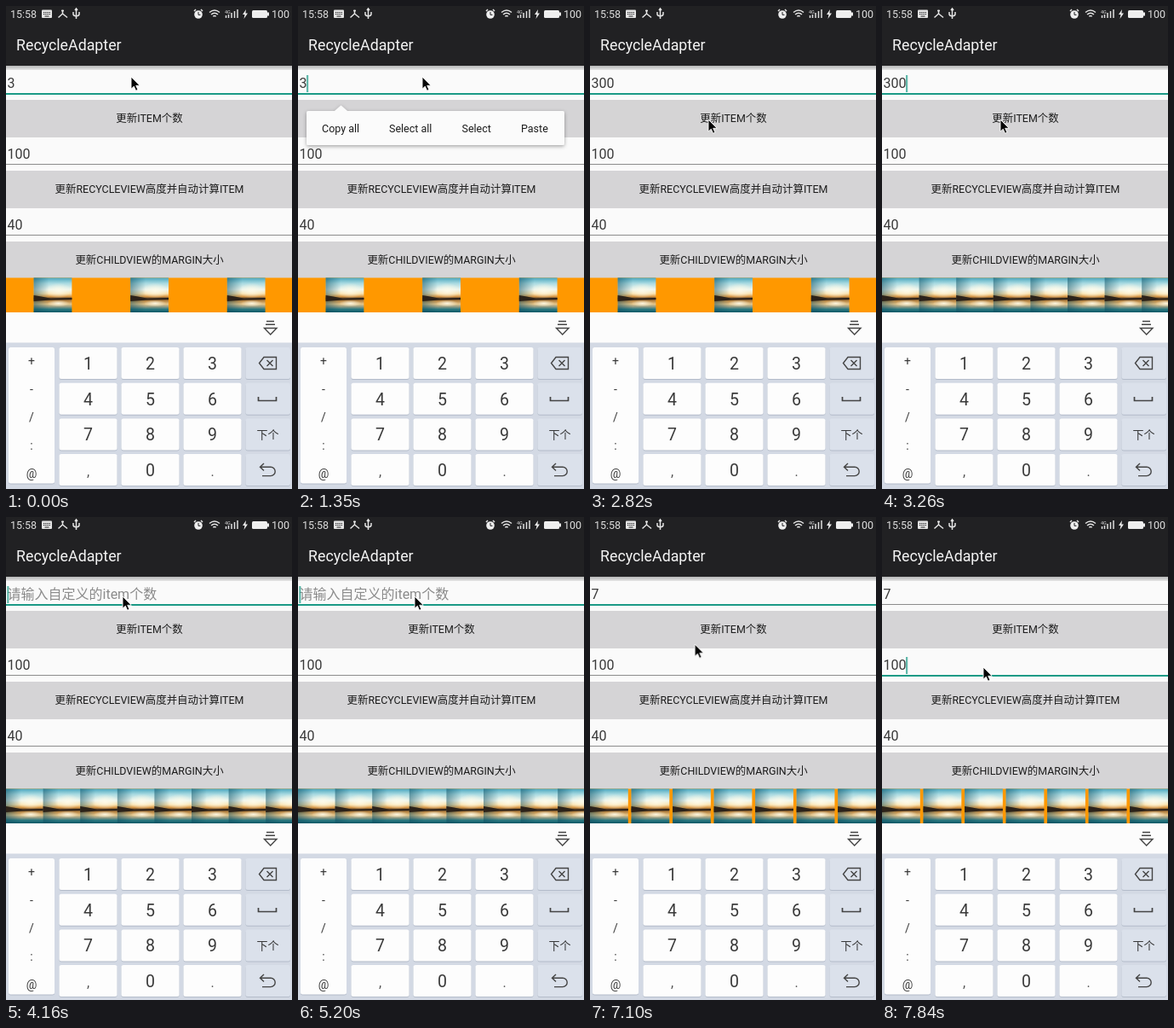
Write an HTML page that moves like this. It is 336 px wide and 566 px high and loops after 7990 ms.

```html
<!DOCTYPE html>
<html lang="zh">
<head>
<meta charset="utf-8">
<title>RecycleAdapter</title>
<style>
html, body { margin: 0; width: 100%; height: 100%; overflow: hidden; background: #fafafa; }
svg { display: block; width: 336px; height: 566px; }
text { font-family: Roboto, "Noto Sans CJK SC", "Noto Sans CJK", sans-serif; }
.mid { text-anchor: middle; }
.field { font-size: 16px; fill: #3a3a3a; }
.hint { fill: #8b8b8b; }
.btn { font-size: 12.45px; fill: #1c1c1c; text-anchor: middle; }
.menu { font-size: 12.5px; fill: #1c1c1c; }
.status { font-size: 12.5px; fill: #dedede; }
.digit { font-size: 19.5px; fill: #3a3a3a; text-anchor: middle; }
.dot { font-size: 16px; fill: #555; text-anchor: middle; }
.sym { font-size: 14px; fill: #3a3a3a; text-anchor: middle; }
.line { fill: none; stroke: #444; stroke-width: 1.4; }
.thin { fill: none; stroke: #e4e4e4; stroke-width: 1.5; }

.step { animation: 7990ms step-end infinite; }
.flow { animation: 7990ms linear infinite; }
#v3 { animation-name: v3; }
#v30 { animation-name: v30; }
#v300 { animation-name: v300; }
#hint { animation-name: hint; }
#v7 { animation-name: v7; }
#caret { animation-name: caret; }
#few { animation-name: few; }
#many { animation-name: many; }
#seven { animation-name: seven; }
#focus1 { animation-name: focus1; }
#focus2 { animation-name: focus2; }
#menu { animation-name: menu; }
#press { animation-name: press; }
#spot { animation-name: spot; }
#ripple { animation-name: ripple; }
#mouse { animation-name: mouse; }

@keyframes v3 { 0%, 50.19% { opacity: 1 } 22.53%, 52.07%, 100% { opacity: 0 } }
@keyframes v30 { 0%, 26.16%, 50.19%, 100% { opacity: 0 } 22.53%, 48.31% { opacity: 1 } }
@keyframes v300 { 0%, 48.31%, 100% { opacity: 0 } 26.16% { opacity: 1 } }
@keyframes hint { 0%, 68.71%, 100% { opacity: 0 } 52.07% { opacity: 1 } }
@keyframes v7 { 0% { opacity: 0 } 68.71%, 100% { opacity: 1 } }
@keyframes caret {
  0% { transform: translate(10.3px, 81px); opacity: 0 }
  4.38%, 16.89%, 38.67%, 65.07%, 81.23% { opacity: 1 }
  10.64%, 32.42%, 58.82%, 74.97%, 87.48% { opacity: 0 }
  22.53%, 48.31% { transform: translate(19.3px, 81px); opacity: 1 }
  26.16% { transform: translate(28.3px, 81px); opacity: 1 }
  50.19%, 68.71% { transform: translate(10.3px, 81px); opacity: 1 }
  52.07% { transform: translate(1.5px, 81px); opacity: 1 }
  94.49%, 100% { transform: translate(28.3px, 164px); opacity: 1 }
}
@keyframes few { 0% { opacity: 1 } 38.92%, 100% { opacity: 0 } }
@keyframes many { 0%, 83.35%, 100% { opacity: 0 } 38.92% { opacity: 1 } }
@keyframes seven { 0% { opacity: 0 } 83.35%, 100% { opacity: 1 } }
@keyframes focus1 { 0% { opacity: 1 } 94.49%, 100% { opacity: 0 } }
@keyframes focus2 { 0% { opacity: 0 } 94.49%, 100% { opacity: 1 } }
@keyframes menu {
  0%, 3.75%, 24.4%, 44.56%, 52.07%, 100% { opacity: 0 }
  7.51%, 20.65%, 46.43%, 48.31% { opacity: 1 }
}
@keyframes press {
  0%, 35.2%, 39.5%, 79.2%, 83.35%, 100% { opacity: 0 }
  35.8%, 38%, 79.7%, 82% { opacity: 1 }
}
@keyframes spot { 0% { transform: translate(139px, 133px) } 60%, 100% { transform: translate(127px, 134px) } }
@keyframes ripple {
  0%, 35.2% { transform: scale(0); opacity: 1 }
  35.8% { transform: scale(1); opacity: 1 }
  39.2% { transform: scale(9); opacity: 0 }
  39.21%, 79.2% { transform: scale(0); opacity: 1 }
  79.72% { transform: scale(1); opacity: 1 }
  83.35%, 100% { transform: scale(9); opacity: 0 }
}
@keyframes mouse {
  0% { transform: translate(147px, 83px) }
  5%, 21% { transform: translate(146px, 83px) }
  28% { transform: translate(144px, 114px) }
  33.4%, 41% { transform: translate(139px, 133px) }
  45%, 69% { transform: translate(137px, 93px) }
  78%, 87% { transform: translate(125px, 137px) }
  93%, 100% { transform: translate(119px, 176px) }
}
</style>
</head>
<body>
<svg viewBox="0 0 336 566">
  <defs>
    <linearGradient id="shade" x2="0" y2="1">
      <stop stop-color="#b4b5b5"/><stop offset="1" stop-color="#e6e6e6"/>
    </linearGradient>
    <linearGradient id="dusk" x2="0" y2="1">
      <stop stop-color="#4aa6bd"/><stop offset=".16" stop-color="#a9dae1"/>
      <stop offset=".34" stop-color="#eef6ee"/><stop offset=".46" stop-color="#fbe2ad"/>
      <stop offset=".54" stop-color="#d99a4a"/><stop offset=".6" stop-color="#5a3f25"/>
      <stop offset=".67" stop-color="#b98745"/><stop offset=".76" stop-color="#e6c68a"/>
      <stop offset=".84" stop-color="#8f9a85"/><stop offset=".91" stop-color="#2a7880"/>
      <stop offset="1" stop-color="#0f5866"/>
    </linearGradient>
    <linearGradient id="side">
      <stop stop-color="#0a4c60" stop-opacity=".5"/><stop offset=".4" stop-color="#0a4c60" stop-opacity="0"/>
    </linearGradient>
    <radialGradient id="glow">
      <stop stop-color="#fffbe9" stop-opacity=".9"/><stop offset="1" stop-color="#fffbe9" stop-opacity="0"/>
    </radialGradient>
    <g id="photo">
      <rect width="44.8" height="40.5" fill="url(#dusk)"/>
      <rect width="44.8" height="40.5" fill="url(#side)"/>
      <ellipse cx="29" cy="15" rx="15.500" ry="9" fill="url(#glow)"/>
      <path d="M0 20.500L9 22 20 24.200 44.800 23.500V25.500L20 26 0 27.500Z" fill="#2c2219"/>
      <ellipse cx="29" cy="30" rx="13" ry="4" fill="url(#glow)"/>
    </g>
    <clipPath id="button"><rect y="110" width="336" height="44"/></clipPath>
    <filter id="soft" x="-5%" y="-20%" width="110%" height="150%">
      <feDropShadow dx="0" dy="1.5" stdDeviation="2" flood-opacity=".35"/>
    </filter>
  </defs>

  <rect width="336" height="566" fill="#fafafa"/>
  <rect width="336" height="70" fill="#212123"/>
  <rect y="70" width="336" height="5" fill="url(#shade)"/>

  <g id="bar">
    <text class="status" x="5" y="14">15:58</text>
    <rect x="42" y="4.500" width="12" height="9.500" rx="1" fill="#e4e4e4"/>
    <path d="M44 7.500h8M44 9.500h8" stroke="#212123" stroke-dasharray="1.3 .9"/>
    <path d="M45.500 12h5" stroke="#212123"/>
    <path class="thin" d="M66.500 4.500V9L61.500 13.500M66.500 9L72 13.500M65 5.500h3"/>
    <path class="thin" d="M82.500 3.500V15M79 7v2.500q0 2 3.500 2.500q3.500-.5 3.500-2.500V7M81 5l1.500-2 1.500 2"/>
    <circle cx="226" cy="10" r="4.800" fill="#eee"/>
    <path d="M226 7v3.300h2.500" fill="none" stroke="#212123"/>
    <path class="thin" d="M221 6l2-2M231 6l-2-2"/>
    <path class="thin" d="M239 7.500q6-5 12 0M241 10q4-3.500 8 0M243.300 12.300q1.700-1.500 3.400 0"/>
    <text x="257" y="8.500" font-size="5.500" fill="#dedede">4G</text>
    <path d="M258.500 14v-3M261.500 14v-4M265 14V8M268.500 14V6M272 14V4" stroke="#dedede" stroke-width="1.500"/>
    <path d="M282 4l-4 6h2.500l-1 5 4.500-6.500h-2.600z" fill="#eee"/>
    <rect x="289" y="5" width="18" height="9" rx="1.500" fill="#eee"/>
    <rect x="307" y="7.500" width="2" height="4" fill="#eee"/>
    <text class="status" x="312" y="14">100</text>
  </g>
  <text x="12" y="52" font-size="17.800" fill="#f4f4f4">RecycleAdapter</text>

  <path d="M0 110h336v44H0zM0 193h336v44H0zM0 276h336v43H0z" fill="#d5d4d6"/>
  <g clip-path="url(#button)">
    <rect id="press" class="flow" y="110" width="336" height="44" fill="#d1cfd2"/>
    <g id="spot" class="step"><circle id="ripple" class="flow" r="9" fill="#c5c4c6"/></g>
  </g>
  <text class="btn" x="168.500" y="136">更新ITEM个数</text>
  <text class="btn" x="168.500" y="219">更新RECYCLEVIEW高度并自动计算ITEM</text>
  <text class="btn" x="168.500" y="301.500">更新CHILDVIEW的MARGIN大小</text>

  <path d="M0 102.500h336M0 185.500h336M0 268.500h336" stroke="#8c8c8c"/>
  <rect id="focus1" class="step" y="102" width="336" height="2" fill="#1b9a86"/>
  <rect id="focus2" class="step" y="185" width="336" height="2" fill="#1b9a86"/>
  <text id="v3" class="field step" x="1.500" y="96">3</text>
  <text id="v30" class="field step" x="1.500" y="96">30</text>
  <text id="v300" class="field step" x="1.500" y="96">300</text>
  <text id="hint" class="field hint step" x="1.500" y="95.500">请输入自定义的item个数</text>
  <text id="v7" class="field step" x="1.500" y="96">7</text>
  <text class="field" x="1.500" y="179">100</text>
  <text class="field" x="1.500" y="262">40</text>
  <rect id="caret" class="step" width="1.500" height="20" fill="#1b9a86"/>

  <rect y="318.500" width="336" height="40.500" fill="#ff9800"/>
  <g id="few" class="step"></g>
  <g id="many" class="step"></g>
  <g id="seven" class="step"></g>

  <rect y="359" width="336" height="36" fill="#fcfcfc"/>
  <path class="line" d="M306 369.500h9M305 373.200h11M303.500 377.500h14.500l-7.250 7.500z"/>
  <rect y="394.500" width="336" height="171.500" fill="#d3d9e4"/>
  <g id="keys"></g>
  <g class="line">
    <path d="M303 411.500h14.500v14H303l-5.500-7zM306.500 415l7 7M313.500 415l-7 7"/>
    <path d="M296.500 458v4.500h21V458" stroke-width="1.700"/>
    <path d="M303 536l-4.500 4.200 4.500 4.200M298.500 540.200H311a5.200 5.200 0 0 1 0 10.400H301"/>
  </g>
  <text class="mid" x="307.500" y="507" font-size="13" fill="#333">下个</text>

  <g id="menu" class="flow">
    <path filter="url(#soft)" d="M12 123H43l7.500-6.500 7.500 6.500H311q2 0 2 2V161q0 2-2 2H12q-2 0-2-2V125q0-2 2-2z" fill="#fbfbfb"/>
    <text class="menu" x="28" y="148">Copy all</text>
    <text class="menu" x="107" y="148">Select all</text>
    <text class="menu" x="192.500" y="148">Select</text>
    <text class="menu" x="262" y="148">Paste</text>
  </g>

  <path id="mouse" class="flow" d="M0 0V14.200L3.300 11.200 5.600 16.300 8 15.200 5.700 10.300H10.200Z" fill="#050505" stroke="#fff" stroke-width=".9"/>
</svg>
<script>
const fill = (id, html) => { document.getElementById(id).innerHTML = html; };
const range = n => [...Array(n).keys()];

// One row of photos, evenly spaced
const row = (id, count, start, pitch) =>
  fill(id, range(count).map(i => `<use href="#photo" x="${start + i * pitch}" y="318.5"/>`).join(''));
row('few', 3, 32.6, 113.6);
row('many', 8, 0, 43.6);
row('seven', 7, 0, 48.53);

const key = (x, y, w, h, color) =>
  `<rect x="${x}" y="${y + 1}" width="${w}" height="${h}" rx="2.5" fill="#b4bcca"/>` +
  `<rect x="${x}" y="${y}" width="${w}" height="${h}" rx="2.5" fill="${color}"/>`;
const label = (cls, x, y, s) => `<text class="${cls}" x="${x}" y="${y}">${s}</text>`;

let pad = key(3, 400, 54, 159.5, '#fdfdfd');
[...'+-/:@'].forEach((s, i) => { pad += label('sym', 30, 421 + i * 33, s); });
['123', '456', '789', ',0.'].forEach((keys, r) => {
  const y = 400 + r * 41.7;
  [...keys].forEach((s, c) => {
    const x = 62.5 + c * 73;
    pad += key(x, y, 68, 37, '#fdfdfd') + label(/\d/.test(s) ? 'digit' : 'dot', x + 34, y + 26, s);
  });
  pad += key(281.5, y, 52.5, 37, '#dbe1eb');
});
fill('keys', pad);
</script>
</body>
</html>
```
